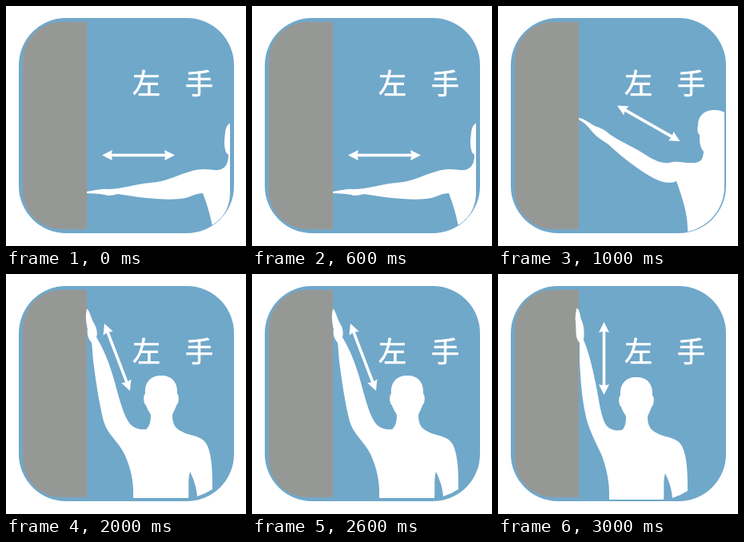
These frames come from a looping animation (300 by 300 pixels, 4000 ms). An HTML page:

```html
<!DOCTYPE html>
<html lang="zh">
<head>
<meta charset="utf-8">
<style>
  html, body { margin: 0; width: 100%; height: 100%; overflow: hidden; background: #fff; }
  svg { display: block; width: 100vw; height: 100vh; }
  text {
    font: 35px "Noto Sans CJK SC", "Noto Sans CJK JP", "Noto Sans CJK", sans-serif;
    stroke: #fff;
    stroke-width: .7px;
  }
  .pose { visibility: hidden; }
</style>
</head>
<body>
<svg viewBox="0 0 300 300" fill="#fff">
  <defs>
    <clipPath id="inner"><rect x="20" y="20" width="260" height="260" rx="45"/></clipPath>
    <clipPath id="outer"><rect x="17" y="16" width="266" height="267" rx="57"/></clipPath>
    <path id="trunk" d="M-13 30C-13 27-17 24-19 17C-22 16-23 4-20 3C-21-12-13-20 0-20S21-12 20 3C23 4 22 16 19 17C17 24 14 27 14 30C14 42 19 47 26 50C36 56 50 54 57 66C64 80 64 104 64 122Q55 128 45 131C44 118 40 109 36 100C33 110 35 122 34 133H-34C-34 105-30 90-25 70L-18 46Q-13 42-13 30Z"/>
    <path id="tip" d="M0 0L13 -6.500L11.500 0L13 6.500Z"/>
  </defs>

  <rect x="16" y="15" width="269" height="269" rx="59" fill="#70a8ca"/>
  <path d="M101 20H69A48 48 0 0 0 21 68V231A48 48 0 0 0 69 279H101Z" fill="#969896" stroke="#8b9fab"/>
  <text y="110" x="158 224">左手</text>

  <g class="pose" data-arrow="120 186.500 211 186.500">
    <path clip-path="url(#inner)" d="M101 232C110 231 119 228 125 229C146 229 163 222 180 221C200 220 214 211 230 207C246 201 257 206 266 205C275 203 278 196 278 186L275 183C272 174 273 169 274 158C275 151 277 148 281 146V281H259C256 263 251 247 246 234C238 234 232 238 224 240C204 244 170 240 140 235Q133 237 127 237C119 234 110 235 101 234Z"/>
  </g>

  <g class="pose" data-arrow="149 124.500 227.500 169">
    <path clip-path="url(#outer)" d="M101 140C106 140 114 146 121 150C128 152 134 155 139 160C153 170 172 177 186 187C197 194 206 197 214 196C222 193 232 196 241 196C250 196 256 196 257 182C252 176 252 169 252 161C249 159 249 153 250 149C250 137 258 130 271 130Q278 130 283 133V284H237C238 260 230 239 223 219C214 223 204 220 194 215C176 205 155 189 138 173C129 167 122 163 116 155Q110 147 101 142Z"/>
  </g>

  <g class="pose" data-arrow="123 62 155 146">
    <use href="#trunk" x="194" y="147"/>
    <path d="M102 44C105 48 106 54 109 60C113 66 115 73 113 79C124 97 132 119 138 143C143 161 148 178 154 186C160 194 169 195 177 194L190 280H159C160 260 156 242 148 225C141 210 127 201 122 184C116 160 112 132 109 108C108 98 108 91 107 86C103 81 101 76 102 69C100 60 99 52 101 44Z"/>
  </g>

  <g class="pose" data-arrow="132.500 60 132.500 151">
    <use href="#trunk" x="173" y="149"/>
    <path d="M99 43C103 46 102 53 105 59C108 67 108 75 107 82C115 102 120 125 125 152C128 170 131 184 136 190C142 196 149 196 156 195L169 282H139C140 260 135 240 129 225C121 208 112 191 109 174C104 150 103 125 102 108L102 86C96 80 98 70 97 60C96 52 98 47 98 43Z"/>
  </g>
</svg>
<script>
const poses = [...document.querySelectorAll(".pose")];

for (const pose of poses) {
  const [x1, y1, x2, y2] = pose.dataset.arrow.split(" ").map(Number);
  const length = Math.hypot(x2 - x1, y2 - y1);
  const angle = Math.atan2(y2 - y1, x2 - x1) * 180 / Math.PI;
  pose.innerHTML += `<g transform="translate(${x1} ${y1}) rotate(${angle})">
    <rect x="10" y="-1.800" width="${length - 20}" height="3.600"/>
    <use href="#tip"/>
    <use href="#tip" transform="translate(${length}) scale(-1 1)"/>
  </g>`;
}

function draw(time) {
  const current = Math.floor(time / 1000) % poses.length;
  poses.forEach((pose, i) => pose.style.visibility = i === current ? "visible" : "hidden");
  requestAnimationFrame(draw);
}
draw(performance.now());
</script>
</body>
</html>
```
